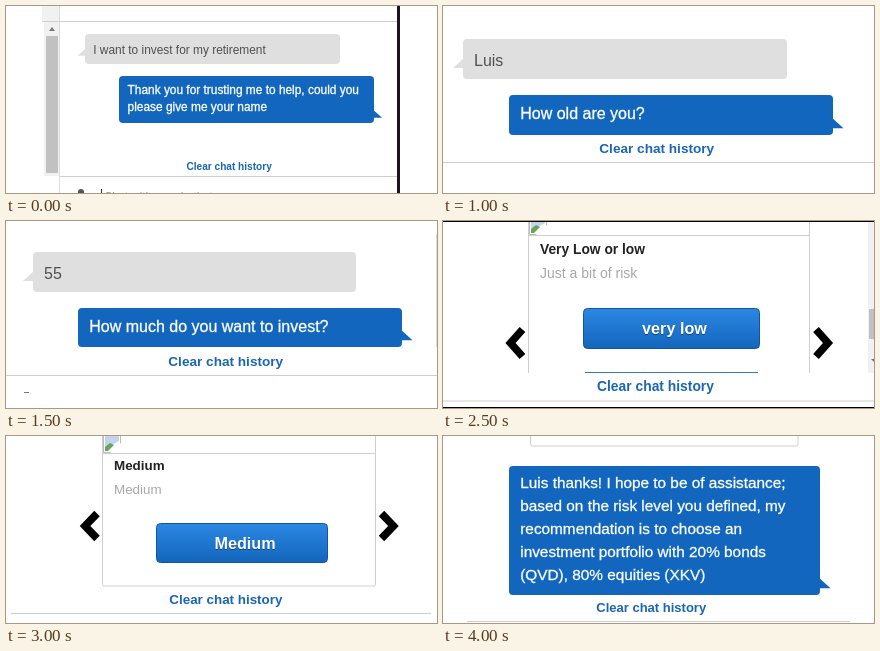
An HTML page that plays this animation: 431 by 187 pixels, repeating every 4.5 s.

```html
<!DOCTYPE html>
<html lang="en">
<head>
<meta charset="utf-8">
<title>Chat walkthrough</title>
<style>
html, body { margin: 0; width: 100%; height: 100%; overflow: hidden; background: #fff; }
svg { display: block; width: 431px; height: 187px; }
text { font-family: "Liberation Sans", Arial, sans-serif; white-space: pre; }
</style>
</head>
<body>
<svg id="stage" viewBox="0 0 431 187">
  <defs>
    <linearGradient id="buttonFill" x2="0" y2="1">
      <stop stop-color="#2b88e3"/><stop offset="1" stop-color="#1365bb"/>
    </linearGradient>
  </defs>
</svg>
<script>
const BLUE = "#1266bd", GREY = "#dfdfdf", RULE = "#cfcfcf";
const SCENE_MS = 500;

const rect = (x, y, w, h, fill, extra = "") =>
  `<rect x="${x}" y="${y}" width="${w}" height="${h}" fill="${fill}" ${extra}/>`;
const path = (d, fill, extra = "") => `<path d="${d}" fill="${fill}" ${extra}/>`;
const label = (x, y, size, fill, words, extra = "") =>
  `<text x="${x}" y="${y}" font-size="${size}" fill="${fill}" ${extra}>${words}</text>`;
const bold = (x, y, size, fill, words, extra = "") =>
  label(x, y, size, fill, words, `font-weight="700" ${extra}`);
const clearLink = (x, y, size) => bold(x, y, size, "#1a65b5", "Clear chat history");
const rule = (y, x = 0, w = 431) => rect(x, y, w, 1, RULE);

// Speech bubbles carry a small wedge near the lower outer corner.
function userBubble(x, y, w, h, tail, size, words) {
  return rect(x, y, w, h, GREY, 'rx="4"') +
    path(`M${x + 1} ${y + h - tail * 2.1}v${tail}h${-tail - 1}z`, GREY) +
    label(x + tail * 1.1, y + h / 2 + size * .42, size, "#505050", words);
}

function botBubble(x, y, w, h, tail, size, lines, firstBaseline, leading = 0) {
  const right = x + w - 1;
  return rect(x, y, w, h, BLUE, 'rx="4"') +
    path(`M${right} ${y + h - tail * 1.65}l${tail + 1} ${tail}h${-tail - 1}z`, BLUE) +
    lines.map((words, i) => label(x + tail * 1.07, firstBaseline + i * leading, size, "#fff", words,
      'stroke="#fff" stroke-width=".3"')).join("");
}

const brokenImage = (x, bottom) =>
  path(`M${x + .5} ${bottom - 18}V${bottom - .5}H${x + 17.5}V${bottom - 18}`, "#fff", 'stroke="#bcbcbc"') +
  path(`M${x + 2} ${bottom - 18}h14v6l-14 8z`, "#c5d4ee") +
  path(`M${x + 2} ${bottom - 2}v-4l5-4 4 2-6 6z`, "#64a75a") +
  path(`M${x + 7} ${bottom}l11-10v10z`, "#fff");

const chevron = (x, y, w, h) =>
  path(`M${x} ${y}l${w} ${h / 2}l${-w} ${h / 2}`, "none", 'stroke="#000" stroke-width="7.6"');

function button(x, y, w, h, words) {
  const cx = x + w / 2 + 3, baseline = y + h / 2 + 5.5;
  return rect(x + .5, y + .5, w - 1, h - 1, "url(#buttonFill)", 'rx="4" stroke="#14569c"') +
    bold(cx, baseline + 1, 16.2, "#0c4480", words, 'text-anchor="middle"') +
    bold(cx, baseline, 16.2, "#fff", words, 'text-anchor="middle"');
}

function tallCard(title, note, choice) {
  return path("M85.5 0V152M366.5 0V152M85 14.5H367", "none", `stroke="${RULE}"`) +
    brokenImage(86, 14) +
    bold(97, 32.5, 13.8, "#222", title) + label(97, 56.5, 14, "#a8a8a8", note) +
    button(140, 87, 177, 41, choice) + rect(142, 151, 173, 1, "#3a78b8") +
    chevron(79.5, 108.5, -12, 27) + chevron(373, 108.5, 12, 27) +
    rect(425, 1, 6, 151, "#f1f1f1") + rect(426, 88, 5, 30, "#c1c1c1") +
    path("M428 138h3v3z", "#777") +
    clearLink(154, 170, 13.85) + rule(179.5);
}

function shortCard(title, note, choice) {
  return path("M96.5 0V148.5q0 1.5 1.5 1.5H368q1.5 0 1.5-1.5V0M96 17.5H370", "none", `stroke="${RULE}"`) +
    brokenImage(97, 17) +
    bold(108, 34, 13.4, "#222", title) + label(108, 57.5, 13.4, "#a8a8a8", note) +
    button(150, 87, 172, 40, choice) +
    chevron(91, 77.5, -12, 25) + chevron(375.5, 77.5, 12, 25) +
    clearLink(163.3, 168, 13.4) + rule(177, 5, 420);
}

const scenes = [
  rect(36, 0, 17, 15, "#f1f1f1") + rect(38, 15, 15, 155, "#f1f1f1") +
    path("M43 25l3-4 3 4z", "#777") + rect(40, 30, 12, 137, "#c1c1c1") +
    rect(53, 0, 1, 187, "#ddd") + rule(15, 36, 355) + rule(170, 54, 337) +
    rect(391, 0, 3, 187, "#1b1420") +
    userBubble(79, 28, 255, 30, 7.5, 11.9, "I want to invest for my retirement") +
    botBubble(113, 70, 255, 47, 8, 11.9,
      ["Thank you for trusting me to help, could you", "please give me your name"], 87.5, 17.5) +
    clearLink(180.5, 163.5, 10.1) +
    `<circle cx="75" cy="186" r="3" fill="#555"/>` + rect(95, 183, 1, 4, "#333") +
    label(98, 193.5, 11.5, "#999", "Chat with our chatbot"),

  userBubble(13, 33, 325, 40, 10, 16, "I worry about my retirement") +
    botBubble(59, 89, 325, 40, 10.5, 16, ["what is your name"], 113) +
    rect(419, 25, 12, 103, "#f1f1f1") + rect(419, 25, 12, 84, "#c1c1c1") +
    path("M422 116h8l-4 4.5z", "#777") +
    clearLink(149.3, 147, 13.6) + rule(156),

  userBubble(20, 33, 324, 40, 10, 16, "Luis") +
    botBubble(66, 89, 324, 40, 10.5, 16, ["How old are you?"], 113) +
    clearLink(156.3, 147, 13.6) + rule(156),

  userBubble(27, 31, 323, 40, 10, 16, "55") +
    botBubble(72, 87, 324, 39, 10.5, 16, ["How much do you want to invest?"], 111) +
    rect(430, 13, 1, 113, "#ddd") +
    clearLink(162.3, 144.5, 13.6) + rule(154) +
    rect(18, 171, 5, 1, "#777"),

  tallCard("None", "No risk at all", "none"),

  tallCard("Very Low or low", "Just a bit of risk", "very low") +
    rect(0, 0, 431, 1, "#000") + rect(0, 186, 431, 1, "#000"),

  shortCard("Medium", "Medium", "Medium"),

  shortCard("High", "High", "High"),

  path("M87.5 0V8q0 2 2 2H353q2 0 2-2V0", "none", `stroke="${RULE}"`) +
    botBubble(66, 30, 311, 129, 10.5, 15.35, [
      "Luis thanks! I hope to be of assistance;",
      "based on the risk level you defined, my",
      "recommendation is to choose an",
      "investment portfolio with 20% bonds",
      "(QVD), 80% equities (XKV)"
    ], 51.5, 23) +
    clearLink(153.3, 176, 13) + rule(185, 24, 383)
];

const stage = document.getElementById("stage");
stage.insertAdjacentHTML("beforeend", scenes.map(s => `<g visibility="hidden">${s}</g>`).join(""));
const groups = [...stage.querySelectorAll("g")];

const start = performance.now();
function draw(now) {
  const elapsed = Math.max(0, now - start);
  const current = Math.floor(elapsed / SCENE_MS) % groups.length;
  groups.forEach((g, i) => g.setAttribute("visibility", i === current ? "visible" : "hidden"));
  requestAnimationFrame(draw);
}
draw(start);
</script>
</body>
</html>
```
